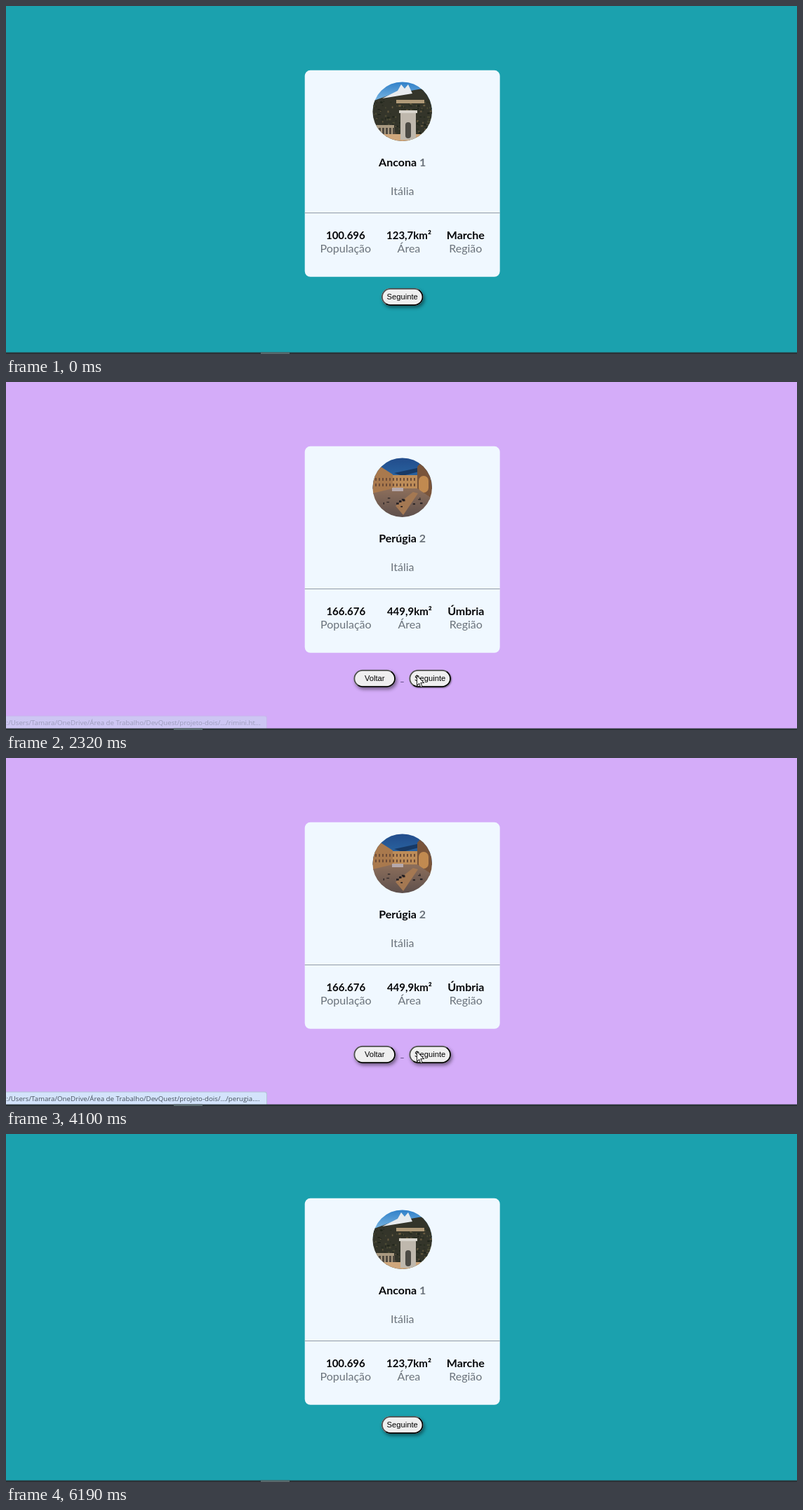
Write an HTML page with a canvas that moves like this. It is 1127 px wide and 497 px high and loops after 6.32 s.

```html
<!DOCTYPE html>
<html lang="pt">
<head>
<meta charset="utf-8">
<title>Cidades</title>
<style>
html, body { margin: 0; width: 100%; height: 100%; overflow: hidden; }
canvas { display: block; }
</style>
</head>
<body>
<canvas id="stage" width="1127" height="497"></canvas>
<script>
const ctx = document.getElementById('stage').getContext('2d');
const W = 1127, H = 497, LOOP = 6320, STEP = 70, FADE = 200;
const CARD = { x: 425.7, y: 91.8, w: 278, h: 295 };
const MID = CARD.x + CARD.w / 2;
const BTN = { w: 59.5, h: 25, pitch: 79 };
const GREY = '#6b737b', INK = '#050608';
const BODY = '16px Lato, sans-serif', BOLD = 'bold ' + BODY, FIGURES = 'bold 15px Lato, sans-serif';
const ROOT = 'C:/Users/Tamara/OneDrive/Área de Trabalho/DevQuest/projeto-dois/';

const ancona = {
  bg: '#1ba1ae', name: 'Ancona', num: '1', tint: GREY, photo: drawHill,
  stats: { 'População': '100.696', 'Área': '123,7km²', 'Região': 'Marche' }, buttons: ['Seguinte']
};
const perugia = {
  bg: '#d4acf9', name: 'Perúgia', num: '2', tint: GREY, photo: drawSquare,
  stats: { 'População': '166.676', 'Área': '449,9km²', 'Região': 'Úmbria' }, buttons: ['Voltar', 'Seguinte']
};
const rimini = {
  bg: '#f4f287', name: 'Rimini', num: '3', tint: INK, photo: drawBeach,
  stats: { 'População': '148.908', 'Área': '134 km²', 'Região': 'Emília-Romagna' }, buttons: ['Voltar']
};

// hovering is noticed only once the pointer has moved on the new page
const visits = [
  { at: 0, city: ancona, live: 0 },
  { at: 1380, city: perugia, live: 1780 },
  { at: 2730, city: rimini, live: 3760 },
  { at: 4100, city: perugia, live: 4360 },
  { at: 4970, city: ancona, live: 5240 }
];
const links = [
  { at: 1110, end: 1780, path: '.../perugia....' },
  { at: 2250, end: 3060, path: '.../rimini.ht...' },
  { at: 3830, end: 4360, path: '.../perugia....' },
  { at: 4500, end: 5240, path: 'index.html' }
];
const moves = [
  { at: 130, steps: 8, pos: u => [574 + 473 * (1 - u) ** 1.8, 428 + 40 * (1 - u ** 3)] },
  { at: 770, steps: 2, pos: u => [570 - 7 * u, 425 - 6 * u] },
  { at: 1780, steps: 4, pos: u => [567 + 18.5 * u, 419 + 3 * Math.sin(Math.PI * u)] },
  { at: 4360, steps: 4, pos: u => [577 - 45 * u, 420 + 2 * u] },
  { at: 5240, steps: 6, pos: u => [540 + 406 * u ** 1.6, 425 + 60 * u] }
];
const clicks = [1310, 2460, 4030, 4770];

const clamp = v => Math.max(0, Math.min(1, v));
const latest = (list, t) => list.filter(k => k.at <= t).pop();

function pointer(t) {
  if (t < 130 || t >= 5730) return null;
  const { at, steps, pos } = latest(moves, t);
  return pos(clamp(Math.floor((t - at) / STEP) / steps));
}

function randomizer(seed) {
  return () => (seed = seed * 16807 % 2147483647) / 2147483647;
}

function rect(color, x, y, w, h) {
  ctx.fillStyle = color;
  ctx.fillRect(x, y, w, h);
}

function poly(color, ...xy) {
  ctx.fillStyle = color;
  ctx.beginPath();
  for (let i = 0; i < xy.length; i += 2) ctx.lineTo(xy[i], xy[i + 1]);
  ctx.closePath();
  ctx.fill();
}

function round(color, x, y, w, h, r) {
  ctx.fillStyle = color;
  ctx.beginPath();
  ctx.roundRect(x, y, w, h, r);
  ctx.fill();
}

function disc(color, x, y, r) {
  ctx.fillStyle = color;
  ctx.beginPath();
  ctx.arc(x, y, r, 0, 7);
  ctx.fill();
}

function fade(x0, y0, x1, y1, a, b, split) {
  const g = ctx.createLinearGradient(x0, y0, x1, y1);
  g.addColorStop(split || 0, a);
  g.addColorStop(split || 1, b);
  return g;
}

function width(str, font) {
  ctx.font = font;
  return ctx.measureText(str).width;
}

function text(str, x, y, font, color, align = 'center') {
  ctx.font = font;
  ctx.fillStyle = color;
  ctx.textAlign = align;
  ctx.fillText(str, x, y);
}

// Photo scenes use a 86 px square, clipped to a circle.
function specks(n, colors, x, y, w, h) {
  const rnd = randomizer(n * 97);
  for (let i = 0; i < n; i++)
    rect(colors[i % colors.length], x + rnd() * w, y + rnd() * h, 1 + 3 * rnd(), 1 + 2 * rnd());
}

function drawHill() {
  rect(fade(0, 0, 0, 26, '#2f7fc8', '#75b2e0'), 0, 0, 86, 40);
  poly('#34352a', 0, 28, 30, 17, 72, 10, 86, 20, 86, 86, 0, 86);
  specks(170, ['#20251b', '#4b4a34', '#2a2f22', '#665a40'], 0, 26, 86, 50);
  poly('#e8ebee', 14, 24, 36, 13, 41, 4, 46, 10, 51, 4, 57, 17);
  rect('#b09a78', 34, 26, 40, 5);
  rect('#a99980', 0, 62, 31, 14);
  for (let x = 4; x < 30; x += 5) rect('#514a40', x, 66, 3, 10);
  rect('#cfa77c', 0, 75, 86, 12);
  rect('#bfb8ad', 40, 43, 22, 40);
  rect('#d8d4cc', 38, 41, 26, 4);
  round('#4c4a44', 47, 58, 8, 23, 4);
}

function drawSquare() {
  rect(fade(0, 0, 0, 32, '#224c8b', '#2a67a4'), 0, 0, 86, 45);
  poly('#173965', 31, 22, 68, 14, 66, 20, 43, 26);
  poly('#a9794d', 0, 13, 12, 13, 29, 24, 29, 47, 0, 52);
  rect('#bd8c58', 29, 25, 36, 20);
  poly('#79543a', 64, 13, 70, 6, 86, 6, 86, 64, 64, 47);
  for (let x = 4; x < 63; x += 5)
    for (let y = 29; y < 42; y += 8) rect('#6d4c38', x, y, 2, 4);
  round('#c18a50', 66, 26, 14, 24, 7);
  poly(fade(0, 44, 0, 86, '#8d6f5b', '#5d4f4c'), 0, 51, 29, 44, 64, 44, 86, 59, 86, 86, 0, 86);
  rect('#b6a9ac', 28, 43, 16, 5);
  poly('#a47852', 33, 69, 58, 49, 65, 51, 44, 82);
  specks(14, ['#241f22'], 15, 54, 56, 16);
}

function drawBeach() {
  rect('#9bc5e5', 0, 0, 86, 8);
  rect(fade(0, 7, 0, 47, '#4e8ea4', '#598f96'), 0, 7, 86, 60);
  poly('#b38b6a', 0, 33, 12, 41, 44, 48, 58, 55, 86, 57, 86, 86, 0, 86);
  poly('#2d444c', 13, 23, 17, 22, 40, 33, 36, 35);
  poly('#2d444c', 44, 35, 49, 34, 86, 50, 86, 53);
  for (let y = 47; y < 90; y += 6)
    for (let x = -6; x < 86; x += 5) {
      const dy = y + x * .22;
      rect('#dcc19a', x, dy, 3, 2);
      rect('#795c49', x, dy + 2, 3, 1.2);
    }
}

function drawStats(stats) {
  const cols = Object.entries(stats).map(([label, value]) => {
    const font = /\d/.test(value) ? FIGURES : BOLD;
    return { label, value, font, w: Math.max(width(label, BODY), width(value, font)) };
  });
  const gap = (CARD.w - cols.reduce((sum, c) => sum + c.w, 0)) / (cols.length + 1);
  let x = CARD.x + gap;
  for (const { label, value, font, w } of cols) {
    text(value, x + w / 2, 333, font, INK);
    text(label, x + w / 2, 352, BODY, GREY);
    x += w + gap;
  }
}

function drawCard(city) {
  round('#f0f8ff', CARD.x, CARD.y, CARD.w, CARD.h, 8);
  ctx.save();
  ctx.beginPath();
  ctx.arc(MID, 150.7, 42.3, 0, 7);
  ctx.clip();
  ctx.translate(522, 108);
  city.photo();
  ctx.restore();

  const half = width(`${city.name} ${city.num}`, BOLD) / 2;
  text(city.name, MID - half, 229, BOLD, INK, 'left');
  text(city.num, MID + half, 229, BOLD, city.tint, 'right');
  text('Itália', MID, 270, BODY, city.tint);
  rect('#929ba4', CARD.x, 295, CARD.w, 1);
  drawStats(city.stats);
}

function drawButton(label, x, y, hover, pressed) {
  const { w, h } = BTN, cx = x + w / 2, cy = y + h / 2;
  ctx.save();
  ctx.shadowColor = 'rgba(0,0,0,.45)';
  ctx.shadowBlur = hover ? 2 : 5;
  ctx.shadowOffsetX = hover ? 1 : 2;
  ctx.shadowOffsetY = hover ? 1 : 3;
  round('#efefef', x, y, w, h, h / 2);
  ctx.restore();
  const edges = pressed ? ['#000', '#4c4c4c'] : ['#4c4c4c', '#000'];
  ctx.strokeStyle = fade(cx - 8, cy - 19, cx + 8, cy + 19, ...edges, .5);
  ctx.lineWidth = 1.8;
  ctx.beginPath();
  ctx.roundRect(x + .9, y + .9, w - 1.8, h - 1.8, h / 2 - .9);
  ctx.stroke();
  text(label, cx, y + 16, '11.2px "Liberation Sans", Arial, sans-serif', '#000');
}

function drawButtons(labels, cursor, down) {
  const n = labels.length, y = 395 + 8 * n;
  labels.forEach((label, i) => {
    const x = MID - BTN.w / 2 + (i - (n - 1) / 2) * BTN.pitch;
    const over = cursor && cursor[0] >= x && cursor[0] <= x + BTN.w &&
      cursor[1] >= y && cursor[1] <= y + BTN.h;
    drawButton(label, x, y, over, over && down);
  });
  if (n > 1) rect('#69518c', MID - 2.5, 428, 4.5, 1);
}

function drawStatus(t) {
  const link = latest(links, t);
  if (!link) return;
  ctx.save();
  ctx.globalAlpha = clamp(Math.min(t - link.at, link.end + FADE - t) / FADE);
  round('#b4c3d8', -5, 476.5, 377, 22, 3);
  round('#d3e3fb', -5, 477.5, 376, 22, 3);
  text(ROOT + link.path, -5.5, 489.5, '9.7px "Open Sans", "Noto Sans", sans-serif', '#47505b', 'left');
  ctx.restore();
}

function drawTaskbar(t) {
  rect('rgba(43,52,56,.35)', 0, 494, W, 1);
  rect('#2b3438', 0, 495, W, 2);
  rect('#57686b', t < 1110 || t >= 6190 ? 363 : 239, 494.5, 41, 2.5);
}

function drawArrow([x, y]) {
  ctx.save();
  ctx.translate(x, y);
  ctx.scale(.86, .92);
  ctx.strokeStyle = '#111';
  ctx.lineWidth = 1.1;
  poly('#fff', 0, 0, 0, 16, 3.7, 12.6, 6.2, 18.4, 8.8, 17.3, 6.3, 11.6, 11.3, 11.4);
  ctx.stroke();
  ctx.restore();
}

function draw(t) {
  const { city, live } = latest(visits, t);
  const cursor = pointer(t);
  const down = clicks.some(c => t >= c && t < c + STEP + (c > live + 400 ? 60 : 0) && t < c + 130);

  rect(city.bg, 0, 0, W, H);
  drawCard(city);
  drawButtons(city.buttons, t >= live && cursor, down);
  drawStatus(t);
  drawTaskbar(t);
  if (cursor) {
    if (down) disc('rgba(252,244,20,.7)', cursor[0], cursor[1] + 1, 13);
    drawArrow(cursor);
  }
}

const begin = performance.now();
function tick(now) {
  draw(Math.max(0, now - begin) % LOOP);
  requestAnimationFrame(tick);
}
draw(0);
requestAnimationFrame(tick);
</script>
</body>
</html>
```
